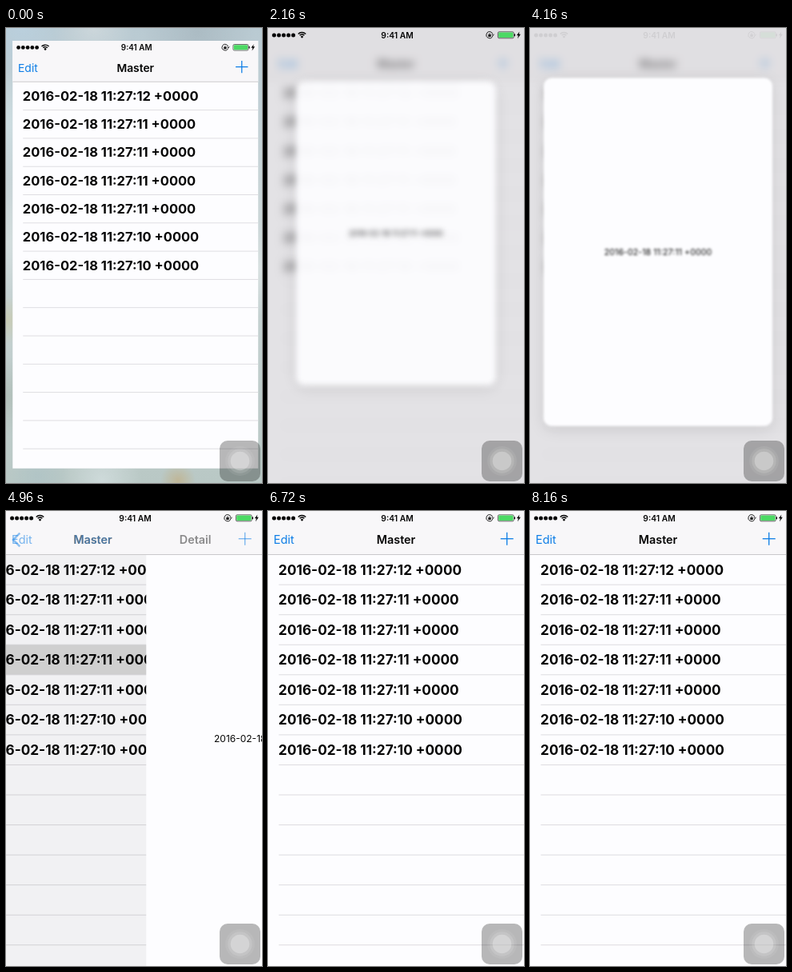
These frames come from a looping animation (320 px wide and 569 px high, 9.28 s). An HTML page with a canvas:

```html
<!DOCTYPE html>
<html lang="en">
<head>
<meta charset="utf-8">
<title>Peek and pop</title>
<style>
html, body { margin: 0; width: 100%; height: 100%; overflow: hidden; background: #fdfdff; }
canvas { display: block; width: 320px; height: 569px; }
</style>
</head>
<body>
<canvas id="stage"></canvas>
<script>
const W = 320, H = 569, LOOP = 9280, STEP = 80;
const PAD = 30;
const NAV = 54.6, ROW = 37.55, PRESSED = 3;
const WHITE = '#fdfdff', BLUE = '#0c7de6', INK = '#050505';
const SECONDS = [12, 11, 11, 11, 11, 10, 10];
const FONT = 'Inter, Roboto, sans-serif';
const K = Math.max(1, window.devicePixelRatio || 1);

// [time, value] pairs
const PRESS = [
  [1280, 0], [1360, .1], [2000, 1], [2560, 1], [3040, 0],
  [3520, 0], [3600, .19], [3840, 1], [4160, 1], [4480, 0],
  [6720, 0], [7200, 1], [7600, 1], [8000, 0]
];
const PEEK = [
  [2000, 0], [2160, .716], [2240, .9], [2320, .97], [2400, 1], [2560, 1], [2880, 0],
  [3840, 0], [4000, .86], [4080, .98], [4160, .955], [4240, .72], [4400, 0],
  [7200, 0], [7360, .72], [7520, .97], [7600, 1], [7680, .82], [7920, 0]
];

const stage = document.getElementById('stage');
stage.width = W * K;
stage.height = H * K;
const ctx = stage.getContext('2d');
const layer = document.createElement('canvas');
layer.width = (W + 2 * PAD) * K;
layer.height = (H + 2 * PAD) * K;
const lctx = layer.getContext('2d');

const clamp = x => Math.max(0, Math.min(1, x));
const mix = (a, b, p) => a + (b - a) * p;
const easeOut = x => 1 - Math.pow(1 - clamp(x), 3);

function track(keys, t) {
  if (t <= keys[0][0]) return keys[0][1];
  for (let i = 1; i < keys.length; i++) {
    const [t0, a] = keys[i - 1], [t1, b] = keys[i];
    if (t <= t1) return mix(a, b, (t - t0) / (t1 - t0));
  }
  return keys[keys.length - 1][1];
}

function fill(g, color, x, y, w, h) {
  g.fillStyle = color;
  g.fillRect(x, y, w, h);
}

function disc(g, color, x, y, r) {
  g.fillStyle = color;
  g.beginPath();
  g.arc(x, y, r, 0, 7);
  g.fill();
}

function box(g, color, x, y, w, h, r) {
  g.fillStyle = color;
  g.beginPath();
  g.roundRect(x, y, w, h, r);
  g.fill();
}

function line(g, color, width, points) {
  g.strokeStyle = color;
  g.lineWidth = width;
  g.beginPath();
  points.forEach(([x, y]) => g.lineTo(x, y));
  g.stroke();
}

function text(g, str, x, y, size, weight, color, align = 'left') {
  g.font = `${weight} ${size}px ${FONT}`;
  g.textAlign = align;
  g.fillStyle = color;
  g.fillText(str, x, y);
}

function faded(g, alpha, draw) {
  if (alpha <= 0) return;
  g.save();
  g.globalAlpha *= alpha;
  draw();
  g.restore();
}

const stamp = i => `2016-02-18 11:27:${SECONDS[i]} +0000`;
const rowTop = i => NAV + ROW * i;
const rowText = (g, i) => text(g, stamp(i), 13.1, rowTop(i) + 25, 17.2, 700, INK);

function drawList(g, selected) {
  fill(g, WHITE, -PAD, -PAD, W + 2 * PAD, H + 2 * PAD);
  faded(g, selected, () => fill(g, '#d9d9d9', 0, rowTop(PRESSED), W, ROW));
  for (let i = 1; i < 15; i++) fill(g, '#dddce0', 13.5, rowTop(i) - .5, W + PAD, 1);
  SECONDS.forEach((s, i) => rowText(g, i));
}

function drawDetail(g) {
  fill(g, WHITE, 0, 0, W, H);
  text(g, stamp(PRESSED), 160, 289.2, 12, 400, INK, 'center');
}

// p: 0 shows the list bar, 1 the detail bar
function drawNav(g, p, backAlpha) {
  fill(g, '#f8f7f9', -PAD, -PAD, W + 2 * PAD, NAV + PAD);
  fill(g, '#c9c8cb', -PAD, 54, W + 2 * PAD, 1);
  faded(g, 1 - p, () => {
    text(g, 'Edit', 7, 41, 14.5, 400, BLUE);
    line(g, BLUE, 1.3, [[290.7, 34.7], [306.7, 34.7]]);
    line(g, BLUE, 1.3, [[298.7, 26.7], [298.7, 42.7]]);
    text(g, 'Master', mix(160, 46, p), 41, 14.4, 600, INK, 'center');
  });
  faded(g, p, () => text(g, 'Detail', mix(300, 160, p), 41, 14.4, 600, INK, 'center'));
  faded(g, p * backAlpha, () => {
    line(g, BLUE, 2.5, [[17.3, 27.6], [9, 36], [17.3, 44.4]]);
    text(g, 'Master', mix(136, 23, p), 41, 14.5, 400, BLUE);
  });
}

function drawStatus(g) {
  for (let i = 0; i < 5; i++) disc(g, INK, 7.6 + 6 * i, 9, 2.5);
  g.strokeStyle = INK;
  g.lineWidth = 1.5;
  for (const r of [3.9, 6.5]) {
    g.beginPath();
    g.arc(42.5, 12, r, -Math.PI * .76, -Math.PI * .24);
    g.stroke();
  }
  disc(g, INK, 42.5, 11.1, 1.4);
  text(g, '9:41 AM', 161.5, 12.7, 10.3, 600, INK, 'center');

  g.lineWidth = .9;
  g.strokeStyle = INK;
  g.beginPath();
  g.arc(277, 8.7, 4, .35, 6);
  g.stroke();
  line(g, INK, .9, [[279.8, 8], [281.2, 9.6], [282.4, 7.8]]);
  fill(g, INK, 275.3, 8.3, 3.4, 2.6);
  g.lineWidth = .7;
  g.beginPath();
  g.arc(277, 8.2, 1.1, Math.PI, 0);
  g.stroke();

  g.lineWidth = .6;
  g.beginPath();
  g.roundRect(287.4, 4.8, 19.8, 8, 1.6);
  g.stroke();
  box(g, '#4cd964', 288.2, 5.6, 18.2, 6.4, 1);
  box(g, INK, 307.7, 7.3, 1.3, 3, .6);
  g.fillStyle = INK;
  g.beginPath();
  [[314.4, 4.4], [310.8, 9.3], [312.9, 9.3], [312, 13.2], [315.8, 7.8], [313.6, 7.8]]
    .forEach(([x, y]) => g.lineTo(x, y));
  g.fill();
}

function drawTouchButton(g) {
  box(g, 'rgba(0,0,0,.28)', 267, 516, 51, 51, 10);
  disc(g, 'rgba(255,255,255,.07)', 292.5, 541.5, 18.5);
  disc(g, 'rgba(255,255,255,.13)', 292.5, 541.5, 15.2);
  disc(g, 'rgba(255,255,255,.28)', 292.5, 541.5, 11.8);
}

function drawWallpaper(g) {
  const base = g.createLinearGradient(0, 0, 0, H);
  base.addColorStop(0, '#b9cad2');
  base.addColorStop(.4, '#cbd6d8');
  base.addColorStop(1, '#b9c8c5');
  fill(g, base, 0, 0, W, H);
  const petals = [
    [20, 0, 60, '186,208,222'], [110, 0, 50, '206,216,220'], [240, 5, 70, '170,186,194'],
    [0, 120, 70, '206,222,226'], [0, 270, 60, '212,222,222'], [0, 365, 30, '200,202,176'],
    [0, 460, 50, '176,190,184'], [40, 560, 40, '176,196,198'], [120, 565, 50, '208,220,220'],
    [215, 566, 22, '192,180,146'], [318, 300, 60, '218,226,226']
  ];
  for (const [x, y, r, rgb] of petals) {
    const glow = g.createRadialGradient(x, y, 0, x, y, r);
    glow.addColorStop(0, `rgba(${rgb},.9)`);
    glow.addColorStop(1, `rgba(${rgb},0)`);
    fill(g, glow, x - r, y - r, 2 * r, 2 * r);
  }
}

// Draws on a padded layer, then stamps it blurred
function blurred(radius, alpha, draw) {
  lctx.setTransform(1, 0, 0, 1, 0, 0);
  lctx.clearRect(0, 0, layer.width, layer.height);
  lctx.setTransform(K, 0, 0, K, PAD * K, PAD * K);
  lctx.save();
  draw(lctx);
  lctx.restore();
  ctx.save();
  ctx.globalAlpha = alpha;
  if (radius > .05) ctx.filter = `blur(${radius * K}px)`;
  ctx.drawImage(layer, -PAD, -PAD, W + 2 * PAD, H + 2 * PAD);
  ctx.restore();
}

function scaleAbout(g, x, y, s) {
  g.translate(x, y);
  g.scale(s, s);
  g.translate(-x, -y);
}

function drawPeek(q) {
  const s = mix(.44, .915, q), y = mix(186, H / 2, q);
  const w = W * s, h = 487 * s;
  blurred(7 * Math.sqrt(1 - q), clamp(q * 1.3), g => {
    g.save();
    g.shadowColor = 'rgba(0,0,0,.1)';
    g.shadowBlur = 20 * K;
    g.shadowOffsetY = 4 * K;
    box(g, WHITE, 160 - w / 2, y - h / 2, w, h, 10);
    g.restore();
    g.translate(160, y);
    g.scale(s, s);
    text(g, stamp(PRESSED), 0, 4.2, 12, 400, INK, 'center');
  });
}

function drawPressed(press, q) {
  fill(ctx, WHITE, 0, 0, W, H);
  blurred(5.2 * press, 1, g => {
    scaleAbout(g, 160, H / 2, 1 - .037 * press);
    drawList(g, 0);
    drawNav(g, 0, 1);
  });
  fill(ctx, `rgba(202,199,203,${.5 * press})`, 0, 0, W, H);
  faded(ctx, clamp(1 - q * 3), () => {
    const top = rowTop(PRESSED);
    scaleAbout(ctx, 160, top + ROW / 2, 1 + .012 * press);
    fill(ctx, '#d3d2d6', -2, top - .6, W + 4, ROW + 1.2);
    fill(ctx, '#fefeff', -2, top, W + 4, ROW);
    rowText(ctx, PRESSED);
  });
  if (q > 0) drawPeek(q);
  faded(ctx, clamp((.97 - q) / .2), () => drawStatus(ctx));
}

function drawApp(p, selected, backAlpha) {
  ctx.save();
  ctx.translate(-96 * p, 0);
  drawList(ctx, selected);
  ctx.restore();
  if (p > 0) {
    fill(ctx, `rgba(0,0,0,${.1 * p})`, 0, 0, W, H);
    ctx.save();
    ctx.translate(W * (1 - p), 0);
    drawDetail(ctx);
    ctx.restore();
  }
  drawNav(ctx, p, backAlpha);
  drawStatus(ctx);
}

function drawLaunch(t) {
  const e = Math.pow(1 - t / 720, 4);
  drawWallpaper(ctx);
  ctx.save();
  ctx.translate(8.3 * e, 16 * e);
  ctx.scale(1 - .041 * e, 1 - .06 * e);
  ctx.beginPath();
  ctx.rect(0, 0, W, H);
  ctx.clip();
  drawApp(0, 0, 1);
  ctx.restore();
}

function drawNavigation(t) {
  const pushed = easeOut((t - 4880) / 440);
  const popped = easeOut((t - 5920) / 440);
  const p = t < 5920 ? pushed : 1 - popped;
  const selected = t < 4880 ? 0 : t < 6320 ? 1 : clamp((6560 - t) / 240);
  drawApp(p, selected, t >= 5920 ? .2 : 1);
}

function render(t) {
  ctx.setTransform(K, 0, 0, K, 0, 0);
  const press = track(PRESS, t);
  if (t < 720) drawLaunch(t);
  else if (press > 0) drawPressed(press, track(PEEK, t));
  else drawNavigation(t);
  drawTouchButton(ctx);
}

const start = performance.now();
function tick() {
  const t = (performance.now() - start) % LOOP;
  render(Math.floor(t / STEP) * STEP);
  requestAnimationFrame(tick);
}
tick();
</script>
</body>
</html>
```
